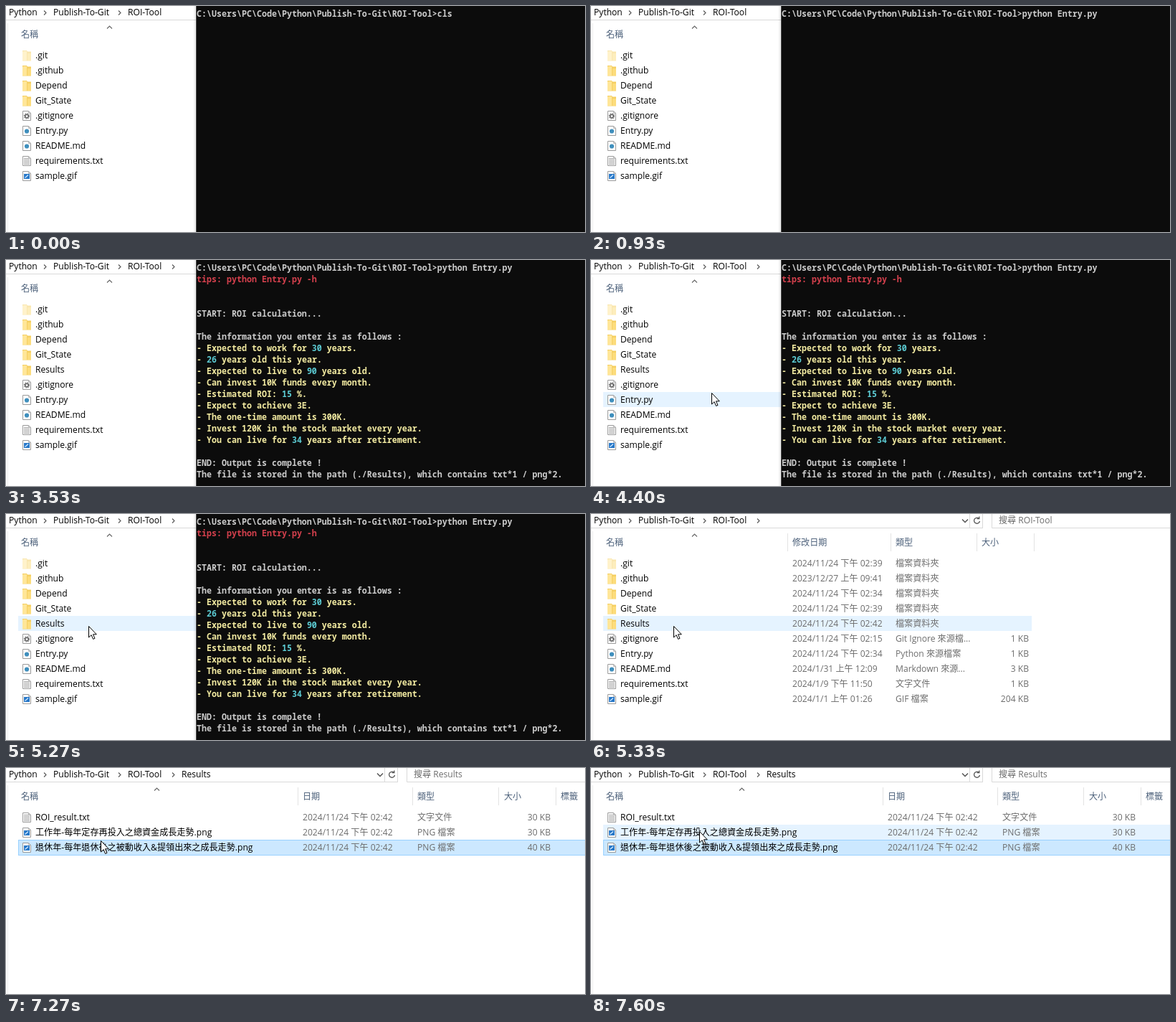
An HTML page that plays this animation: 808x315 px, repeating every 7.94 s.

```html
<!DOCTYPE html>
<html lang="zh-Hant">
<head>
<meta charset="utf-8">
<title>ROI-Tool</title>
<style>
html, body { margin: 0; width: 100%; height: 100%; overflow: hidden; background: #fff; }
svg { display: block; width: 808px; height: 315px; }
text { font: 12.1px "Open Sans", "Noto Sans CJK TC", "Noto Sans CJK JP", sans-serif; white-space: pre; }
.mono { font: 600 11.667px "Noto Sans Mono", "DejaVu Sans Mono", monospace; }
</style>
</head>
<body>
<svg id="stage" viewBox="0 0 808 315"></svg>
<script>
const LOOP = 7940, FPS = 15;
const stage = document.getElementById('stage');

const GREY = '#6d6d6d', HEAD = '#4c607a';
const esc = s => s.replace(/&/g, '&amp;').replace(/</g, '&lt;').replace(/>/g, '&gt;');
const text = (x, y, s, fill = '#000', extra = '') =>
  `<text x="${x}" y="${y}" fill="${fill}" ${extra}>${esc(s)}</text>`;
const rect = (x, y, w, h, fill, extra = '') =>
  `<rect x="${x}" y="${y}" width="${w}" height="${h}" fill="${fill}" ${extra}/>`;
const line = (d, stroke, w = 1) =>
  `<path d="${d}" fill="none" stroke="${stroke}" stroke-width="${w}"/>`;

// name, icon, date, type, size
const day = time => '2024/11/24 下午 ' + time;
const DIR = '檔案資料夾';
const ROOT = [
  ['.git', 'faded', day('02:39'), DIR],
  ['.github', 'folder', '2023/12/27 上午 09:41', DIR],
  ['Depend', 'folder', day('02:34'), DIR],
  ['Git_State', 'folder', day('02:39'), DIR],
  ['Results', 'folder', day('02:42'), DIR],
  ['.gitignore', 'gear', day('02:15'), 'Git Ignore 來源檔...', '1 KB'],
  ['Entry.py', 'dot', day('02:34'), 'Python 來源檔案', '1 KB'],
  ['README.md', 'dot', '2024/1/31 上午 12:09', 'Markdown 來源...', '3 KB'],
  ['requirements.txt', 'lines', '2024/1/9 下午 11:50', '文字文件', '1 KB'],
  ['sample.gif', 'image', '2024/1/1 上午 01:26', 'GIF 檔案', '204 KB']
];
const RESULTS = [
  ['ROI_result.txt', 'lines', day('02:42'), '文字文件', '30 KB'],
  ['工作年-每年定存再投入之總資金成長走勢.png', 'image', day('02:42'), 'PNG 檔案', '30 KB'],
  ['退休年-每年退休後之被動收入&提領出來之成長走勢.png', 'image', day('02:42'), 'PNG 檔案', '40 KB']
];

const ROOT_VIEW = {
  place: 'ROI-Tool', caret: 144.5, right: 615, date: 281, type: 425, size: 611,
  heads: [[281, '修改日期'], [425, '類型'], [545, '大小']], seps: [274.5, 418.5, 538.5, 618.5]
};
const RESULT_VIEW = {
  place: 'Results', caret: 210.5, right: 812, date: 414, type: 574, size: 760,
  heads: [[414, '日期'], [574, '類型'], [695, '大小'], [774, '標籤']], seps: [407.5, 567.5, 687.5, 767.5]
};

// [row, text, colour]; braces mark highlighted numbers
const YELLOW = '#f4eca2', CYAN = '#5ccbd3', PALE = '#cccccc';
const REPORT = [
  [1, 'tips: python Entry.py -h', '#d4404d'],
  [4, 'START: ROI calculation...', PALE],
  [6, 'The information you enter is as follows :', PALE],
  ...['Expected to work for {30} years.', '{26} years old this year.',
    'Expected to live to {90} years old.', 'Can invest 10K funds every month.',
    'Estimated ROI: {15} %.', 'Expect to achieve 3E.', 'The one-time amount is 300K.',
    'Invest 120K in the stock market every year.', 'You can live for {34} years after retirement.'
  ].map((s, i) => [7 + i, '- ' + s, YELLOW])
];
const ENDING = [
  [17, 'END: Output is complete !', PALE],
  [18, 'The file is stored in the path (./Results), which contains txt*1 / png*2.', PALE]
];

// tick, x, y of the pointer
const PATH = [
  [60, 761, 294], [61, 640, 272], [62, 500, 250], [63, 380, 228], [64, 280, 208], [65, 205, 193],
  [66, 168, 185], [67, 145, 176], [68, 128, 167], [69, 118, 160], [70, 115, 156],
  [86, 115, 156], [89, 117, 156], [96, 117, 156],
  [97, 119, 145], [98, 126, 122], [99, 132, 101], [111, 132, 101], [112, 139, 97], [114, 151, 88]
];

function pointerAt(k) {
  if (k < PATH[0][0]) return null;
  for (let i = 1; i < PATH.length; i++) {
    const [a, ax, ay] = PATH[i - 1], [b, bx, by] = PATH[i];
    if (k <= b) {
      const u = (k - a) / (b - a);
      return [Math.round(ax + (bx - ax) * u), Math.round(ay + (by - ay) * u)];
    }
  }
  return PATH[PATH.length - 1].slice(1);
}

function icon(kind, c) {
  if (kind === 'folder' || kind === 'faded') {
    return `<g opacity="${kind === 'faded' ? 0.5 : 1}">` +
      `<path d="M23 ${c - 7}h6l1 1.5h5v13h-12z" fill="#f5cf62"/>` +
      `<path d="M24 ${c - 6}h5v13h-6v-12z" fill="#ffe698"/>` +
      rect(30, c - 3, 5, 10, '#fcdc7c') + '</g>';
  }
  const page = `<path d="M23.5 ${c - 6.5}h8l3 3v10h-11z" fill="#fff" stroke="#9a9a9a"/>` +
    line(`M31.5 ${c - 6.5}v3h3`, '#b4b4b4');
  const circle = (r, fill, extra = '') => `<circle cx="29" cy="${c + 0.5}" r="${r}" fill="${fill}" ${extra}/>`;
  if (kind === 'gear') return page + circle(2.3, '#fff', 'stroke="#666" stroke-width="1.6"') +
    circle(3.6, 'none', 'stroke="#666" stroke-width="1.2" stroke-dasharray="1.4 1.43"');
  if (kind === 'dot') return page + circle(3.1, '#3f8fbd');
  if (kind === 'image') return page + rect(25, c - 3, 8, 7, '#2878c8') +
    line(`M26.5 ${c + 2.5}l4.5 -4`, '#d4ebff', 1.3);
  return page + line([-3.5, -1.5, 0.5, 2.5, 4.5].map(d => `M25 ${c + d}h8`).join(''), '#a5a5a5');
}

function addressBar(view, chevron, wide) {
  const inside = view === RESULT_VIEW;
  let s = text(4, 13, 'Python') + text(66, 13, 'Publish-To-Git') + text(170, 13, 'ROI-Tool');
  if (inside) s += text(245, 13, 'Results');
  const marks = chevron ? [53, 157, 232] : [53, 157];
  s += line(marks.map(x => `M${x} 6.5l3 3l-3 3`).join(''), '#555', 1.1);
  s += line('M0 19.5H' + (wide ? 547 : 265), '#d9d9d9');
  if (!wide) return s;
  return s + line('M528.5 0V19M546.5 0V19M559.5 0V19.5H808', '#d9d9d9') +
    line('M518 7.5l4 4l4 -4', '#555', 1.5) +
    line('M541.2 6.2A4 4 0 1 0 542.5 10M541.8 3.5v3.2h-3.2', '#555', 1.3) +
    text(569, 13, '搜尋 ' + view.place, GREY);
}

function rowBox(view, i, picked) {
  const y = 58 + 21 * i, w = view.right - 17;
  return picked
    ? rect(17.5, y + 0.5, w - 1, 21, '#cce8ff', 'stroke="#99d1ff"')
    : rect(17, y, w, 21, '#e5f3ff');
}

function explorer(view, rows, hover, picked, chevron, wide) {
  let s = rect(0, 0, 808, 315, '#fff') + line('M2.5 24V315', '#ececec');
  s += addressBar(view, chevron, wide);
  s += text(21, 44, '名稱', HEAD);
  s += line(`M${view.caret - 3.5} 31.5l3.5 -3.5l3.5 3.5`, '#666', 1.1);
  if (wide) {
    s += line(view.seps.map(x => `M${x} 27V52`).join(''), '#e3e3e3');
    for (const [x, label] of view.heads) s += text(x, 44, label, HEAD);
  }
  if (hover >= 0 && hover < rows.length && hover !== picked) s += rowBox(view, hover, false);
  if (picked >= 0) s += rowBox(view, picked, true);
  rows.forEach(([name, kind, date, type, size], i) => {
    const c = 69 + 21 * i, y = c + 4;
    s += icon(kind, c) + text(41, y, name);
    if (!wide) return;
    s += text(view.date, y, date, GREY) + text(view.type, y, type, GREY);
    if (size) s += text(view.size, y, size, GREY, 'text-anchor="end"');
  });
  return s;
}

function consoleLine([row, str, fill]) {
  const body = esc(str).replace(/\{(\d+)\}/g, `<tspan fill="${CYAN}">$1</tspan>`);
  return `<text class="mono" x="266" y="${15 + 16 * row}" fill="${fill}">${body}</text>`;
}

function terminal(k) {
  const command = k < 14 ? 'cls' : 'python Entry.py';
  const lines = [[0, 'C:\\Users\\PC\\Code\\Python\\Publish-To-Git\\ROI-Tool>' + command, PALE]];
  if (k >= 34) lines.push(...REPORT);
  if (k >= 35) lines.push(ENDING[0]);
  if (k >= 36) lines.push(ENDING[1]);
  return rect(262, 0, 3, 315, '#000', 'opacity=".06"') + rect(265, 0, 543, 315, '#0c0c0c') +
    line('M265.5 0V315', '#4a4a4a') + lines.map(consoleLine).join('');
}

const arrow = ([x, y]) =>
  `<path transform="translate(${x} ${y})" d="M.5 .5V16L4.1 12.6L6.6 18.4L9 17.4L6.5 11.8H11.3Z" fill="#fff" stroke="#000"/>`;

function draw(k) {
  const wide = k >= 80, inside = k >= 83;
  const view = inside ? RESULT_VIEW : ROOT_VIEW;
  const rows = inside ? (k >= 84 ? RESULTS : []) : ROOT.filter(r => k >= 48 || r[0] !== 'Results');
  const p = pointerAt(k);
  const hover = p && (wide || p[0] < 265) ? Math.floor((p[1] - 58) / 21) : -1;
  const picked = inside ? (k >= 109 ? 2 : -1) : (k >= 81 ? 4 : -1);
  stage.innerHTML = explorer(view, rows, hover, picked, k >= 53, wide) +
    (wide ? '' : terminal(k)) + (p ? arrow(p) : '');
}

const start = performance.now();
let shown = -1;
function tick() {
  const t = (performance.now() - start) % LOOP;
  const k = Math.floor((t + 4) * FPS / 1000);
  if (k !== shown) draw(shown = k);
  requestAnimationFrame(tick);
}
tick();
</script>
</body>
</html>
```
